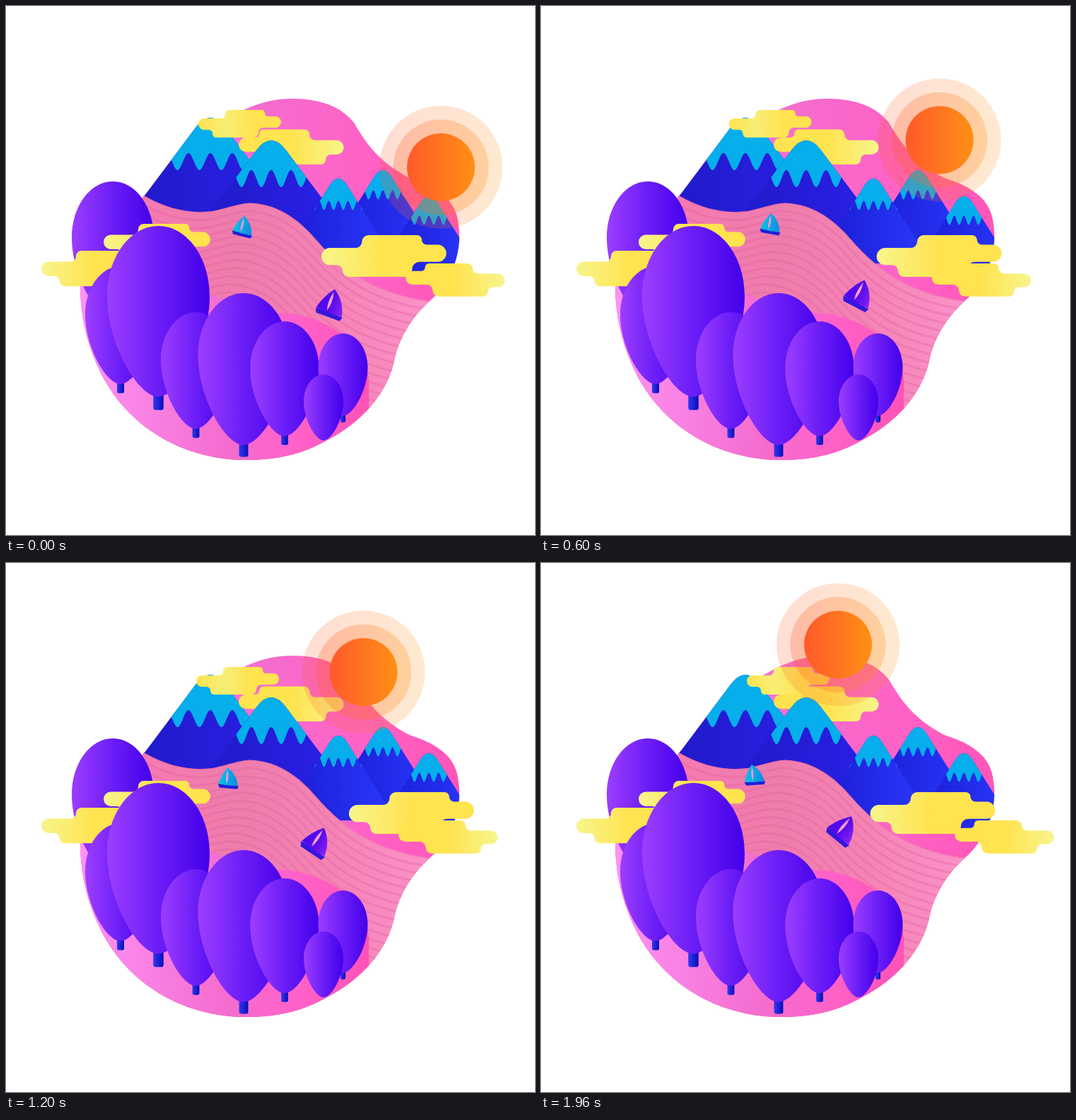
Animation of 748x748 px, one loop 2 s. Source, as an HTML page with a canvas:

```html
<!DOCTYPE html>
<html lang="en">
<head>
<meta charset="utf-8">
<title>Sunrise bay</title>
<style>
html, body { margin: 0; width: 100%; height: 100%; overflow: hidden; background: #fff; }
canvas { display: block; width: 100vw; height: 100vh; }
</style>
</head>
<body>
<canvas id="stage" width="748" height="748"></canvas>
<script>
const SIZE = 748, LOOP = 2000, STEP = 40;
const TURN = 950, END = LOOP - STEP;
const PALE = '#f7f58c', GOLD = '#ffe34f';
const stage = document.getElementById('stage').getContext('2d');
const back = document.createElement('canvas');
back.width = back.height = SIZE;
let g = back.getContext('2d');

function ramp(x0, x1, cols) {
  const r = g.createLinearGradient(x0, 0, x1, 0);
  cols.forEach((c, i) => r.addColorStop(i / (cols.length - 1), c));
  return r;
}

function fill(path, style) {
  g.fillStyle = style;
  g.fill(path);
}

function clipped(path, draw) {
  g.save();
  g.clip(path);
  draw();
  g.restore();
}

const blob = new Path2D(`M290 175 C335 142 370 131 405 131 C445 131 475 143 492 165
  C515 205 535 224 570 243 C604 254 637 270 640 310 C645 345 632 385 605 412
  C575 437 557 468 550 497 C541 547 502 590 452 615 C420 633 385 642 340 642
  C255 642 180 600 140 530 C118 490 105 445 105 395 L195 268 Z`);
const shore = `195 268 C230 288 262 294 292 290 C320 284 330 279 345 278.5
  C388 280 418 306 440 332 C470 366 515 407 606 418`;
const water = new Path2D(`M${shore} L650 650 L100 650 L100 268 Z`);
const ground = new Path2D(`M100 385 L262 396 C300 410 340 432 390 434
  C450 436 512 478 513 530 L513 660 L100 660 Z`);

function drawWater() {
  fill(water, ramp(195, 600, ['#f57bb0', '#ee7dad', '#f584b6', '#fa92c8']));
  clipped(water, () => {
    const line = new Path2D('M' + shore);
    g.lineWidth = 3;
    g.strokeStyle = 'rgba(222,84,146,.26)';
    for (let k = 0; k < 20; k++) {
      g.save();
      g.translate(-3 * k, 11.5 * k);
      g.stroke(line);
      g.restore();
    }
  });
}

const BIG = { slope: .75, round: 14, amp: 12, cols: ['#1f1ac8', '#2b20e8'] };
const SMALL = { slope: .63, round: 10, amp: 6.5, cols: ['#1a19ce', '#2a3aff'] };

// Straight slopes under a rounded peak, with a wavy snow cap.
function mountain(x, y, base, drop, period, { slope, round, amp, cols }) {
  const top = y - round;
  const foot = slope * (base - top), bend = slope * round * 2;
  const body = new Path2D(`M${x - foot} ${base} L${x - bend} ${y + round}
    Q${x} ${top} ${x + bend} ${y + round} L${x + foot} ${base} Z`);
  fill(body, ramp(x - foot, x + foot, cols));
  clipped(body, () => {
    g.beginPath();
    g.moveTo(x - foot, top);
    for (let d = -foot; d <= foot; d++)
      g.lineTo(x + d, y + drop - amp * Math.cos(d / period * 2 * Math.PI));
    g.lineTo(x + foot, top);
    g.fillStyle = '#06aeeb';
    g.fill();
  });
}

// One stepped outline, scaled and, with flip -1, mirrored.
function cloud(x, y, scale, flip = 1, cols = [PALE, GOLD, GOLD]) {
  const wide = 117;
  const pts = [[0, 12], [38, 12], [38, 0], [94, 0], [94, 9], [wide, 9],
    [wide, 25], [85, 25], [85, 39], [20, 39], [20, 28], [0, 28]];
  const gap = (a, b) => Math.hypot(a[0] - b[0], a[1] - b[1]);
  const n = pts.length;
  g.save();
  g.translate(flip < 0 ? x + wide * scale : x, y);
  g.scale(flip * scale, scale);
  g.beginPath();
  g.moveTo(66, 0);
  for (let i = 3; i < n + 3; i++) {
    const a = pts[i - 1], p = pts[i % n], b = pts[(i + 1) % n];
    g.arcTo(...p, ...b, Math.min(8, gap(a || pts[(i - 1) % n], p) / 2, gap(p, b) / 2));
  }
  g.closePath();
  g.fillStyle = ramp(0, wide, cols);
  g.fill();
  g.restore();
}

// Every tree has the same proportions; w is half its width.
function tree(x, top, w, trunk = true) {
  const h = 3.33 * w, mid = top + .41 * h, low = top + h, k = .552;
  if (trunk) {
    const t = w / 10;
    g.fillStyle = ramp(x - t, x + t, ['#3038f0', '#0b0cb8']);
    g.beginPath();
    g.roundRect(x - t, low - 8, 2 * t, 8 + .26 * w, t / 2);
    g.fill();
  }
  const side = s => `C${x + s * k * w} ${top} ${x + s * w} ${mid - k * (mid - top)} ${x + s * w} ${mid}
    C${x + s * w} ${mid + .47 * (low - mid)} ${x + s * w * .4} ${low} ${x} ${low}`;
  const half = s => new Path2D(`M${x} ${top} ${side(s)} Z`);
  const crown = half(-1);
  crown.addPath(half(1));
  fill(crown, ramp(x - w, x + w, ['#9c3eff', '#6b1df6', '#4300ea']));
}

function drawScene() {
  g.fillStyle = '#fff';
  g.fillRect(0, 0, SIZE, SIZE);
  fill(blob, ramp(105, 641, ['#ff90f2', '#f07ad8', '#f56ccd', '#ff62c6', '#ff55b8']));
  mountain(289, 158, 296, 62, 31, BIG);
  cloud(329, 174.5, 1.27, -1);
  mountain(375, 190, 322, 54, 28, BIG);
  clipped(blob, () => {
    mountain(533, 232, 364, 35, 13.6, SMALL);
    mountain(470, 244, 364, 38, 13.6, SMALL);
    mountain(598, 269, 380, 34, 13.6, SMALL);
    drawWater();
    fill(ground, ramp(105, 513, ['#ff92f4', '#f880e2', '#f46dcf', '#ff62c8', '#ff52b6']));
  });
  tree(151, 248, 58);
  cloud(50, 346, 1.29);
  cloud(138, 308, 1.29);
  tree(162, 368, 50);
  tree(215.5, 311, 72.5);
  tree(268.5, 433, 49.5);
  tree(336, 406, 64.5);
  tree(394, 446, 48.7);
  tree(476.5, 463, 35);
  tree(449, 521, 28, false);
}

function boat(x, y, deg, size, sail, hull) {
  g.save();
  g.translate(x, y);
  g.rotate(deg * Math.PI / 180);
  g.scale(size, size);
  fill(new Path2D('M-13 7 L16.5 7.5 L14.8 12 L-10.5 12 Z'), hull);
  fill(new Path2D('M-1 -17 Q-9 -7 -12.5 6.5 Q0 9 15.5 7 Q12 -9 -1 -17 Z'), ramp(-13, 16, sail));
  fill(new Path2D('M-1 -14.5 Q2.4 -3 -1 6 Q-3.8 -2 -1 -14.5 Z'), '#f59ccb');
  g.restore();
}

function disc(x, y, r, alpha) {
  g.globalAlpha = alpha;
  g.fillStyle = ramp(x - r, x + r, ['#ff5a2a', '#ff7420', '#ff9014']);
  g.beginPath();
  g.arc(x, y, r, 0, 2 * Math.PI);
  g.fill();
  g.globalAlpha = 1;
}

function frame(now) {
  const t = Math.floor(now % LOOP / STEP) * STEP;
  const mix = (a, b, p) => a + (b - a) * p;
  const glide = (a, b) => mix(a, b, t / END);
  const swing = (a, b, c) => t < TURN ? mix(a, b, t / TURN) : mix(b, c, (t - TURN) / (END - TURN));

  g.drawImage(back, 0, 0);
  boat(glide(334, 300), glide(313.5, 302), swing(14, 8, -4), 1,
    ['#08c4e6', '#0aa6e6', '#1686de'], '#1c22d6');
  boat(glide(458, 425), glide(423, 377), swing(20, 31.5, 40), 1.38,
    ['#4a08ee', '#5a0cec', '#8a24f6'], '#3416de');

  cloud(swing(272, 261.8, 291), 147, 1, 1, [GOLD, '#f7ee76', GOLD, GOLD]);
  cloud(swing(446, 491.3, 465.5), 324, 1.51);
  cloud(swing(565, 545.2, 585), 364, 1.2, -1);

  const x = swing(615, 533.6, 420), y = swing(228, 167, 115.5);
  disc(x, y, 87, .2);
  disc(x, y, 67.5, .27);
  disc(x, y, 48, 1);
}

let start = null;
function tick(now) {
  if (start === null) start = now;
  frame(now - start);
  requestAnimationFrame(tick);
}

drawScene();
g = stage;
requestAnimationFrame(tick);
</script>
</body>
</html>
```
